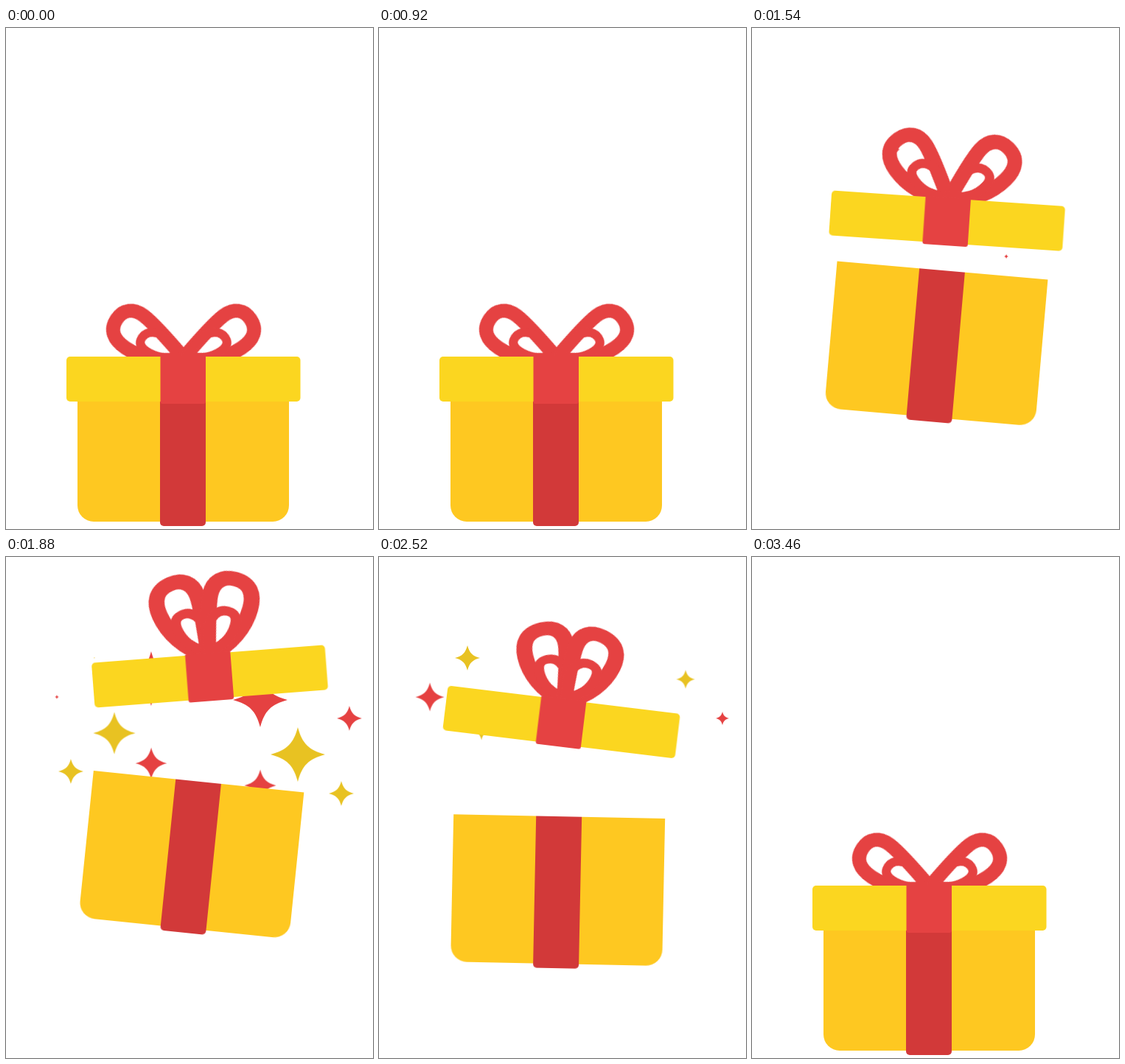
An HTML page without scripts that plays this animation: 498x680 px, repeating every 3600 ms.

```html
<!DOCTYPE html>
<html lang="en">
<head>
<meta charset="utf-8">
<title>Gift box</title>
<style>
html, body { margin: 0; width: 100%; height: 100%; overflow: hidden; background: #fff; }
svg { display: block; width: 498px; height: 680px; }

.anim { animation: 3.6s ease-in-out infinite; }
.jump { animation-name: jump; }
.tilt { animation-name: tilt; transform-origin: 240px 676px; }
.lift { animation-name: lift; }
.lid { animation-name: lid; transform-origin: 240.5px 476.5px; }
.left { animation-name: left; }
.right { animation-name: right; }
.curl { animation-name: curl; }

.loop { fill: none; stroke: #e54242; }
.loop path { vector-effect: non-scaling-stroke; }
.big { stroke-width: 19px; }
.small { stroke-width: 12px; }

.red { fill: #e54141; }
.gold { fill: #e8c222; }
.star { animation: 3.6s infinite backwards; animation-delay: var(--d); }
.quick { animation-name: quick; }
.slow { animation-name: slow; }

@keyframes jump {
  0%, 34.89% { transform: translateY(0); animation-timing-function: cubic-bezier(.165, .84, .44, 1); }
  55% { transform: translateY(-167px); animation-timing-function: cubic-bezier(.33, 0, .67, .2); }
  80.33%, 100% { transform: translateY(0); }
}
@keyframes tilt {
  0% { transform: rotate(0deg); }
  2.5% { transform: rotate(-2.2deg); }
  5.8% { transform: rotate(1.2deg); }
  8.89% { transform: rotate(0deg); }
  34.89% { transform: rotate(0deg); animation-timing-function: cubic-bezier(.165, .84, .44, 1); }
  55% { transform: rotate(5.9deg); animation-timing-function: cubic-bezier(.33, .08, .67, .45); }
  80.56% { transform: rotate(-5.4deg); }
  86.11% { transform: rotate(1.5deg); }
  91.4% { transform: rotate(-.7deg); }
  96.11%, 100% { transform: rotate(0deg); }
}
@keyframes lift {
  0%, 25.56% { transform: translateY(0); }
  34% { transform: translateY(17px); }
  35.1% { transform: translateY(17px); }
  40% { transform: translateY(0); animation-timing-function: cubic-bezier(.25, .6, .45, 1); }
  52.22% { transform: translateY(-150px); animation-timing-function: ease-out; }
  58% { transform: translateY(-157px); animation-timing-function: cubic-bezier(.45, 0, .75, .6); }
  70% { transform: translateY(-135px); animation-timing-function: cubic-bezier(.3, .2, .67, .7); }
  80.56%, 100% { transform: translateY(0); }
}
@keyframes lid {
  0%, 25.56% { transform: rotate(0deg); }
  34%, 35.1% { transform: rotate(-.5deg); }
  40% { transform: rotate(0deg); }
  52.22% { transform: rotate(-10.3deg); }
  70% { transform: rotate(5.8deg); }
  79.2%, 100% { transform: rotate(0deg); }
}
@keyframes left {
  0%, 25.56% { transform: rotate(-56deg) scale(1, 1); }
  34%, 35.1% { transform: rotate(-58deg) scale(1, 1); }
  40% { transform: rotate(-42deg) scale(1.05, 1.02); }
  52.22% { transform: rotate(-20deg) scale(1.15, 1.05); }
  70% { transform: rotate(-20deg) scale(1.15, .98); }
  79.44% { transform: rotate(-43deg) scale(.98, .92); }
  86.11%, 100% { transform: rotate(-56deg) scale(1, 1); }
}
@keyframes right {
  0%, 25.56% { transform: rotate(-56deg) scale(1, 1); }
  34%, 35.1% { transform: rotate(-64deg) scale(1, 1); }
  40% { transform: rotate(-44deg) scale(1.05, 1.02); }
  52.22% { transform: rotate(-20deg) scale(1.15, 1.05); }
  70% { transform: rotate(-20deg) scale(1.15, .98); }
  79.44% { transform: rotate(-65deg) scale(.95, .89); }
  86.11%, 100% { transform: rotate(-56deg) scale(1, 1); }
}
@keyframes curl {
  0%, 70% { transform: rotate(0deg); }
  79.44% { transform: rotate(42deg); }
  86.11%, 100% { transform: rotate(0deg); }
}
@keyframes quick {
  0% { transform: scale(0); animation-timing-function: ease-out; }
  9.72% { transform: scale(1); animation-timing-function: ease-in; }
  20.8%, 100% { transform: scale(0); }
}
@keyframes slow {
  0% { transform: scale(0); animation-timing-function: ease-out; }
  12.5% { transform: scale(1); animation-timing-function: ease-in; }
  27.5%, 100% { transform: scale(0); }
}
</style>
</head>
<body>
<svg viewBox="0 0 498 680" width="498" height="680">
  <defs>
    <path id="spark" d="M0-1C.16-.4 .4-.16 1 0C.4 .16 .16 .4 0 1C-.16 .4-.4 .16-1 0C-.4-.16-.16-.4 0-1Z"/>
    <path id="big" d="M1 0C8-25 17-62 18-76C19-94 9-104-6-104C-24-104-32-92-32-72C-32-48-22-20 0 0"/>
    <path id="small" d="M0 0C5-15 12-36 9-47C5-59-3-63-12-61C-23-58-21-38-15-24L0 0"/>
  </defs>

  <g class="red">
    <g transform="translate(197 165) scale(37)"><use href="#spark" class="star quick" style="--d:1.52s"/></g>
    <g transform="translate(345 194) scale(37)"><use href="#spark" class="star quick" style="--d:1.53s"/></g>
    <g transform="translate(197 280) scale(21.5)"><use href="#spark" class="star quick" style="--d:1.5s"/></g>
    <g transform="translate(345 310) scale(21.5)"><use href="#spark" class="star quick" style="--d:1.51s"/></g>
    <g transform="translate(466 219) scale(25)"><use href="#spark" class="star slow" style="--d:1.66s"/></g>
    <g transform="translate(69 190) scale(25)"><use href="#spark" class="star slow" style="--d:1.85s"/></g>
  </g>
  <g class="gold">
    <g transform="translate(147 239) scale(28.5)"><use href="#spark" class="star quick" style="--d:1.54s"/></g>
    <g transform="translate(88 291) scale(17)"><use href="#spark" class="star quick" style="--d:1.55s"/></g>
    <g transform="translate(396 268) scale(37)"><use href="#spark" class="star quick" style="--d:1.52s"/></g>
    <g transform="translate(455 321) scale(17)"><use href="#spark" class="star quick" style="--d:1.55s"/></g>
    <g transform="translate(120 137) scale(21)"><use href="#spark" class="star slow" style="--d:1.87s"/></g>
    <g transform="translate(416 166) scale(15.5)"><use href="#spark" class="star slow" style="--d:1.87s"/></g>
    <g transform="translate(139 235) scale(16.5)"><use href="#spark" class="star slow" style="--d:1.87s"/></g>
  </g>

  <g class="anim jump"><g class="anim tilt">
    <path fill="#fec821" d="M97 470H384V648A22 22 0 0 1 362 670H119A22 22 0 0 1 97 648Z"/>
    <path fill="#d23939" d="M209 470H271V671A5 5 0 0 1 266 676H214A5 5 0 0 1 209 671Z"/>

    <g class="anim lift"><g class="anim lid">
      <g class="loop" transform="translate(240 448)">
        <g class="anim left">
          <use href="#big" class="big"/>
          <use href="#small" class="small"/>
        </g>
        <g transform="translate(2 0) scale(-1 1)">
          <g class="anim right">
            <use href="#big" class="big"/>
            <g class="anim curl"><use href="#small" class="small"/></g>
          </g>
        </g>
      </g>
      <rect x="82" y="446" width="317.5" height="61" rx="5" fill="#fbd620"/>
      <path fill="#e54242" d="M209.500 445H271V507A3 3 0 0 1 268 510H212.500A3 3 0 0 1 209.500 507Z"/>
    </g></g>
  </g></g>
</svg>
</body>
</html>
```
